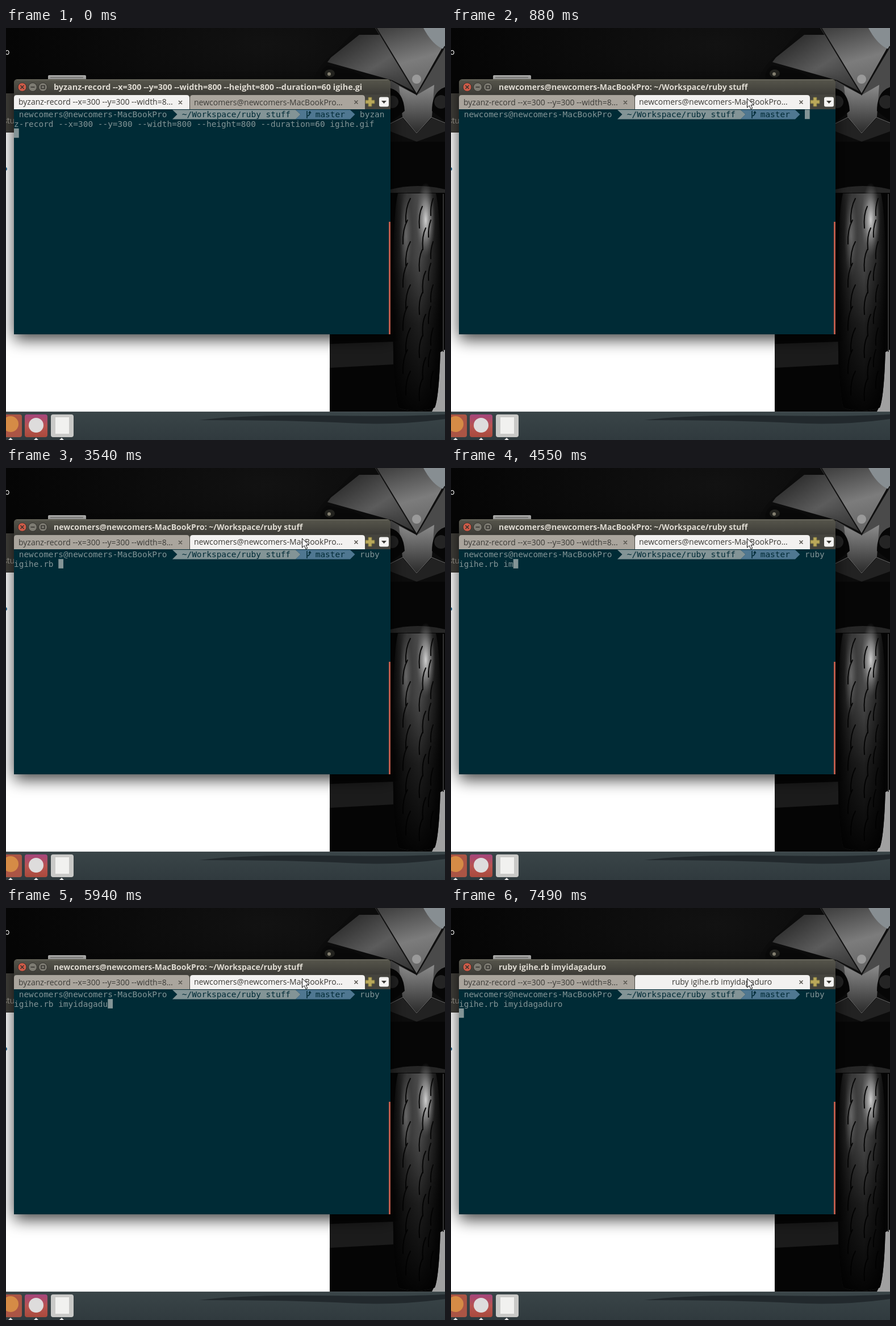
An HTML page that plays this animation: 773 px wide and 725 px high, repeating every 8000 ms.

```html
<!DOCTYPE html>
<html lang="en">
<head>
<meta charset="utf-8">
<title>Terminal session</title>
<style>
  html, body { margin: 0; width: 100%; height: 100%; overflow: hidden; background: #050505; }
  svg { display: block; }
  text { white-space: pre; }
  .mono { font: 14.45px "DejaVu Sans Mono", monospace; fill: #839496; }
  .ink { fill: #002b36; }
  .ui { font: 14px "Open Sans", sans-serif; fill: #3c3b37; }
  #title { font-weight: bold; fill: #dfdbd2; }
</style>
</head>
<body>
<svg width="773" height="725" viewBox="0 0 773 725">
  <defs>
    <linearGradient id="bar" x2="0" y2="1"><stop stop-color="#57564c"/><stop offset="1" stop-color="#3d3c37"/></linearGradient>
    <linearGradient id="side" x2="1" y2="1"><stop stop-color="#1c1c1c"/><stop offset=".55" stop-color="#5c5c5c"/><stop offset="1" stop-color="#303030"/></linearGradient>
    <linearGradient id="nose" x2=".3" y2="1"><stop stop-color="#3c3c3c"/><stop offset=".6" stop-color="#7c7c7c"/><stop offset="1" stop-color="#686868"/></linearGradient>
    <linearGradient id="cowl" x2="0" y2="1"><stop stop-color="#8c8c8c"/><stop offset="1" stop-color="#2c2c2c"/></linearGradient>
    <linearGradient id="tyre"><stop stop-color="#0b0b0b"/><stop offset=".3" stop-color="#3d3d3d"/><stop offset=".55" stop-color="#565656"/><stop offset=".8" stop-color="#2c2c2c"/><stop offset="1" stop-color="#080808"/></linearGradient>
    <linearGradient id="dim" x2="0" y2="1"><stop stop-opacity=".1"/><stop offset=".3" stop-opacity=".15"/><stop offset=".6" stop-opacity=".65"/><stop offset="1" stop-opacity=".95"/></linearGradient>
    <radialGradient id="shine"><stop stop-color="#eee"/><stop offset=".5" stop-color="#bbb" stop-opacity=".6"/><stop offset="1" stop-color="#777" stop-opacity="0"/></radialGradient>
    <linearGradient id="dock" x2="0" y2="1"><stop stop-color="#3a4548"/><stop offset="1" stop-color="#303a3e"/></linearGradient>
    <linearGradient id="tile" x2="0" y2="1"><stop stop-color="#a4457c"/><stop offset=".5" stop-color="#b85450"/><stop offset="1" stop-color="#a94a3c"/></linearGradient>
    <radialGradient id="glow" cx=".6" cy=".1" r=".6"><stop stop-color="#121212"/><stop offset="1" stop-color="#050505"/></radialGradient>
    <filter id="shadow" x="-10%" y="-10%" width="120%" height="125%"><feDropShadow dx="0" dy="9" stdDeviation="14" flood-opacity=".75"/></filter>
  </defs>

  <!-- wallpaper -->
  <rect width="773" height="725" fill="#050505"/>
  <rect width="773" height="300" fill="url(#glow)"/>
  <path d="M540 93Q552 62 580 42L618 0H773V282H677V93Z" fill="#0c0c0c"/>
  <path d="M572 52L622 12H690L720 112L680 92L566 60Z" fill="url(#side)"/>
  <path d="M554 90Q552 73 566 66L612 76L640 92Z" fill="#090909"/>
  <ellipse cx="570" cy="80" rx="9" ry="7" fill="#242420"/>
  <circle cx="569" cy="81" r="3" fill="#8d8878"/>
  <path d="M650 0H773V26L723 115Z" fill="url(#nose)"/>
  <path d="M735 0H773V38Q752 32 735 0Z" fill="#878e92"/>
  <path d="M677 92L723 118L773 34V112L728 158L677 112Z" fill="#4a4a4a"/>
  <path d="M692 102L723 118L754 100L750 156L723 184L698 156Z" fill="url(#cowl)"/>
  <path d="M652 0L723 117L773 32" fill="none" stroke="#111" stroke-width="2"/>
  <circle cx="723" cy="90" r="8" fill="#9a9a9a"/>
  <path d="M677 106Q700 112 702 146L677 166Z" fill="#060606"/>
  <path d="M773 104Q750 112 750 146L773 164Z" fill="#060606"/>
  <circle cx="680" cy="130" r="11" fill="#242424"/>
  <circle cx="766" cy="130" r="12" fill="#242424"/>
  <path d="M677 168L698 158L723 186L750 158L773 168V182L723 200L677 182Z" fill="#222"/>
  <path d="M677 168L699 157L723 185L749 157L773 167" fill="none" stroke="#6e6e6e"/>
  <rect x="677" y="200" width="96" height="83" fill="#060606"/>
  <path d="M677 284Q725 272 773 284V290H677Z" fill="#262626"/>
  <rect x="570" y="290" width="203" height="385" fill="#050505"/>
  <path d="M570 556L682 552V592L570 598Z" fill="#1b1b1b"/>
  <path d="M762 572L773 566V675H750Q764 650 762 572Z" fill="#a0a0a0"/>
  <path d="M690 291H757Q766 330 766 480Q766 640 755 668Q722 680 691 668Q681 640 681 480Q681 330 690 291Z" fill="url(#tyre)"/>
  <ellipse cx="739" cy="338" rx="17" ry="66" fill="url(#shine)"/>
  <ellipse cx="704" cy="365" rx="12" ry="80" fill="url(#shine)" opacity=".35"/>
  <g id="treads" fill="none" stroke="#080808" stroke-width="2" stroke-linecap="round"/>
  <path d="M690 291H757Q766 330 766 480Q766 640 755 668Q722 680 691 668Q681 640 681 480Q681 330 690 291Z" fill="url(#dim)"/>
  <path d="M770 292V570" stroke="#333" stroke-width="2"/>

  <!-- desktop items and rear window -->
  <text class="ui" x="-2" y="47" style="fill:#fff">o</text>
  <rect x="74" y="83" width="67" height="14" rx="2" fill="#b9b9b7"/>
  <path d="M78 87H136" stroke="#8d8d8b" stroke-width="2"/>
  <rect y="115" width="570" height="69" fill="#413f3a"/>
  <rect y="184" width="570" height="491" fill="#fff"/>
  <text class="ui" x="-5" y="168" style="fill:#aaa69d">stu</text>
  <circle cx="-1" cy="248" r="3" fill="#1c6592"/>

  <!-- dock -->
  <rect y="675" width="773" height="50" fill="url(#dock)"/>
  <path d="M340 690Q420 680 560 682T773 680V688Q690 700 600 695T340 690Z" fill="#22292d"/>
  <path d="M0 675.5H773" stroke="#4a5356"/>
  <rect x="-12" y="680" width="40" height="40" rx="4" fill="#ab5545"/>
  <circle cx="8" cy="697" r="14" fill="#d58b46"/>
  <rect x="33" y="680" width="40" height="40" rx="4" fill="url(#tile)"/>
  <circle cx="53" cy="699" r="13" fill="#dedcdc"/>
  <rect x="79" y="680" width="40" height="40" rx="4" fill="#c9c9c7"/>
  <rect x="87" y="685" width="24" height="29" fill="#f1f1ef"/>
  <path d="M4 725L8 721L12 725ZM49 725L53 721L57 725ZM94 725L98 721L102 725Z" fill="#e4e4e4"/>

  <!-- terminal window -->
  <path d="M14 539V97Q14 90 21 90H670Q677 90 677 97V539Z" fill="url(#bar)" filter="url(#shadow)"/>
  <path d="M14 117V97Q14 90 21 90H670Q677 90 677 97V117Z" fill="url(#bar)"/>
  <path d="M19 91.5H672" stroke="#6b6a60"/>
  <g stroke="#33322e">
    <circle cx="28.5" cy="104" r="7.5" fill="#cf5b48"/>
    <circle cx="47" cy="104" r="7.5" fill="#7d7b72"/>
    <circle cx="65" cy="104" r="7.5" fill="#7d7b72"/>
    <path d="M25.5 101l6 6m0-6l-6 6M43.5 104h7M62 101.5h6v5h-6z" fill="none" stroke-width="1.5"/>
  </g>
  <text id="title" class="ui" x="84" y="109"></text>
  <rect x="14" y="117" width="663" height="26" fill="#45443e"/>
  <path id="tab0" d="M14 143V123Q14 118 19 118H318Q323 118 323 123V143Z"/>
  <path id="tab1" d="M324 143V123Q324 118 329 118H627Q632 118 632 123V143Z"/>
  <text id="label0" class="ui" x="22">byzanz-record --x=300 --y=300 --width=8…</text>
  <text id="label1" class="ui"></text>
  <path d="M304 128l6 6m0-6l-6 6M613.5 127.5l6 6m0-6l-6 6" stroke="#55534d" stroke-width="1.5"/>
  <path d="M638 122h6v5h5v6h-5v5h-6v-5h-5v-6h5z" fill="#b9a85a" stroke="#77703f"/>
  <rect x="657" y="121.5" width="17" height="17" rx="3" fill="#f4f3f1"/>
  <path d="M661 128h9l-4.5 5z" fill="#3c3b37"/>

  <rect x="14" y="143" width="663" height="396" fill="#002b36"/>
  <rect x="674" y="341" width="3" height="198" fill="#bd5b4c"/>

  <!-- prompt -->
  <text class="mono" x="22.7" y="157">newcomers@newcomers-MacBookPro</text>
  <path d="M293 144H510L518.600 152L510 160.500H293L301.500 152Z" fill="#839496"/>
  <path d="M510 144H606L614.500 152L606 160.500H510L518.600 152Z" fill="#4f7791"/>
  <text class="mono ink" x="309.8" y="157">~/Workspace/ruby stuff</text>
  <path d="M530 146V159M530 155Q535 154 535 149M533 150l2-3 2 3" fill="none" stroke="#002b36" stroke-width="1.5"/>
  <text class="mono ink" x="544.7" y="157">master</text>
  <text id="line0" class="mono" x="623" y="157"></text>
  <text id="line1" class="mono" x="14" y="173.5"></text>
  <rect id="caret" width="8.7" height="16.5" fill="#839496"/>

  <path id="mouse" d="M0 0V16L3.800 12.500L6.500 18.500L9.200 17.300L6.600 11.500H11.800Z" fill="#fff" stroke="#111"/>
</svg>
<script>
const LOOP = 8000, COL = 8.7, ROW = 16.5, WRAP = 5;
const RECORD = 'byzanz-record --x=300 --y=300 --width=800 --height=800 --duration=60 igihe.gif';
const COMMAND = 'ruby igihe.rb imyidagaduro';
const HOST = 'newcomers@newcomers-MacBookPro';
const SWITCH = 880, ENTER = 7340, RETITLE = 7420, RELABEL = 7490;

// [time, characters typed]
const KEYS = [
  [2100, 1], [2170, 2], [2240, 3], [2400, 4], [2770, 5], [3080, 6], [3180, 7],
  [3280, 8], [3540, 14], [4400, 15], [4550, 16], [4850, 17], [4990, 18],
  [5250, 19], [5380, 20], [5570, 21], [5640, 22], [5790, 23], [5940, 24],
  [6730, 25], [6780, 26]
];
const CARET_OFF = [[330, SWITCH], [1460, 2030], [4100, 4350], [6510, 6680]];

const $ = id => document.getElementById(id);
const set = (id, attrs) => {
  for (const name in attrs) $(id).setAttribute(name, attrs[name]);
};
const write = (id, text) => {
  if ($(id).textContent !== text) $(id).textContent = text;
};

function drawTreads() {
  let marks = '';
  for (let i = 0; i < 9; i++) {
    const y = 300 + i * 38;
    marks += `<path d="M${712 - i % 2 * 5} ${y}q-9 16 -8 42M${733 + i % 2 * 6} ${y + 14}q-7 14 -5 38M${752 - i % 2 * 4} ${y}q-5 14 -4 30"/>`;
  }
  $('treads').innerHTML = marks;
}

function drawTabs(t) {
  const active = t < SWITCH ? 0 : 1;
  for (const i of [0, 1]) {
    set('tab' + i, { fill: i === active ? '#f2f1f0' : '#aaa59d' });
    set('label' + i, { y: i === active ? 135 : 136 });
  }
  const renamed = t >= RELABEL;
  write('label1', renamed ? COMMAND : HOST + '…');
  set('label1', { x: renamed ? 389 : 331 });
  write('title', !active ? RECORD.slice(0, -1)
    : t < RETITLE ? HOST + ': ~/Workspace/ruby stuff' : COMMAND);
  $('title').style.fontSize = active ? '14px' : '14.4px';
}

function drawShell(t) {
  const count = KEYS.reduce((n, [time, len]) => t >= time ? len : n, 0);
  const text = t < SWITCH ? RECORD : COMMAND.slice(0, count);
  write('line0', text.slice(0, WRAP));
  write('line1', text.slice(WRAP));

  let col = 70 + count, row = 0;
  if (t < SWITCH || t >= ENTER) [col, row] = [0, 2];
  else if (count >= WRAP) [col, row] = [count - WRAP, 1];
  const off = CARET_OFF.some(([a, b]) => t >= a && t < b);
  set('caret', { x: 14 + col * COL, y: 143.7 + row * ROW, visibility: off ? 'hidden' : 'visible' });
}

function drawMouse(t) {
  const left = (1 - Math.min(1, Math.max(0, (t - 330) / 440))) ** 2;
  set('mouse', {
    transform: `translate(${521.5 - 20 * left} ${124 + 104 * left})`,
    visibility: t < 330 ? 'hidden' : 'visible'
  });
}

const start = performance.now();
function frame() {
  const t = (performance.now() - start) % LOOP;
  drawTabs(t);
  drawShell(t);
  drawMouse(t);
  requestAnimationFrame(frame);
}
drawTreads();
frame();
</script>
</body>
</html>
```
